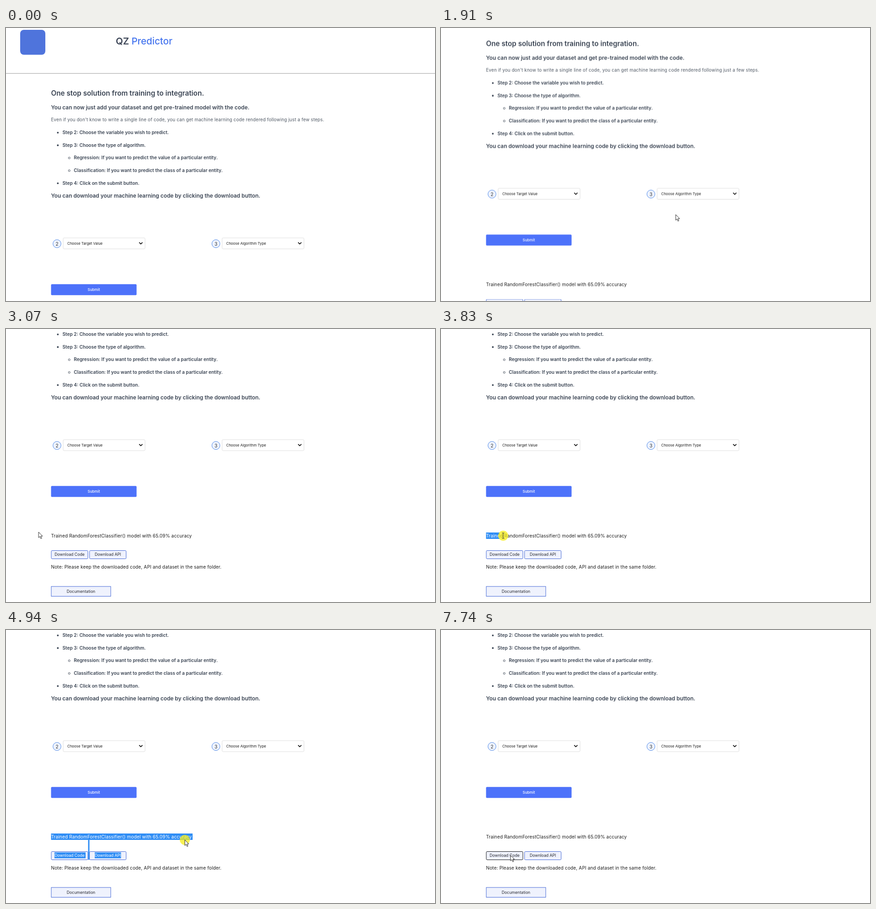
Write an HTML page that moves like this. It is 938 by 597 pixels and loops after 8000 ms.

```html
<!DOCTYPE html>
<html lang="en">
<head>
<meta charset="utf-8">
<title>Model trainer walkthrough</title>
<style>
  html, body { margin: 0; width: 100%; height: 100%; overflow: hidden; background: #fff; }
  svg { display: block; width: 938px; height: 597px; font-family: Inter, "Open Sans", sans-serif; }
  text { white-space: pre; }

  .name { font-size: 20.5px; fill: #3f4859; font-weight: 600; }
  .name .accent { fill: #4474ee; font-weight: 500; }
  .strong { font-weight: 600; fill: #3a4453; }
  .h1 { font-size: 15.25px; }
  .h2 { font-size: 11.88px; }
  .item { font-size: 10.1px; }
  .lead { font-size: 9.8px; letter-spacing: .185px; fill: #4f5864; }
  .body { font-size: 10px; letter-spacing: .16px; fill: #1c1c1c; }
  .small { font-size: 7.85px; fill: #1c1c1c; }
  .num { font-size: 10px; fill: #333; text-anchor: middle; }
  .label { font-size: 8.7px; fill: #26282e; text-anchor: middle; }
  .submit { font-size: 8px; font-weight: 500; }
  .white { fill: #fff; }
  .field { fill: #fff; stroke: #dedede; }
  .btn { fill: #eff2fd; stroke: #4468d6; }
  .mark { fill: #2f8df5; }

  /* All clocks share one 8 s loop. */
  .page, .pointer, .arrow, .beam, .halo, .range, .picked, .api, .code {
    animation: 8s infinite step-end;
    animation-delay: -5ms;
  }
  .page { animation-name: scroll; }
  .pointer { animation-name: move; }
  .arrow { animation-name: arrow; }
  .beam { animation-name: beam; }
  .halo { animation-name: press; }
  .range { animation-name: select; }
  .picked { animation-name: pick; }
  .api { animation-name: api; }
  .code { animation-name: code; }

  @keyframes scroll {
    0% { transform: none; }
    23% { transform: translateY(0); animation-timing-function: steps(4, start); }
    26.5%, 100% { transform: translateY(-217px); }
  }
  @keyframes move {
    0% { transform: translate(955px, 620px); }
    2.5% { transform: translate(955px, 620px); animation-timing-function: steps(5, start); }
    6.9375% { transform: translate(640px, 455px); animation-timing-function: steps(5, start); }
    11.375% { transform: translate(516px, 408px); }
    21.25% { transform: translate(516px, 408px); animation-timing-function: steps(7, start); }
    27.375% { transform: translate(511px, 408px); }
    31.5% { transform: translate(511px, 408px); animation-timing-function: steps(5, start); }
    35.875% { transform: translate(70px, 443px); }
    37.5% { transform: translate(70px, 443px); animation-timing-function: steps(5, start); }
    42.8125% { transform: translate(76px, 448px); }
    44.25% { transform: translate(80px, 448px); }
    45.1375% { transform: translate(80px, 448px); animation-timing-function: steps(4, start); }
    48.6875% { transform: translate(136px, 452px); animation-timing-function: steps(7, start); }
    54.875% { transform: translate(307px, 458px); animation-timing-function: steps(6, start); }
    60.125% { transform: translate(385px, 460px); }
    61.75% { transform: translate(391px, 459px); }
    62.625% { transform: translate(401px, 457px); }
    69.5% { transform: translate(401px, 457px); animation-timing-function: steps(3, start); }
    72.125% { transform: translate(406px, 457px); }
    78.625% { transform: translate(406px, 457px); animation-timing-function: steps(7, start); }
    84.75% { transform: translate(186.5px, 489.5px); }
    87.25% { transform: translate(186.5px, 489.5px); animation-timing-function: steps(11, start); }
    97.7%, 100% { transform: translate(152px, 492.5px); }
  }
  @keyframes arrow {
    0% { opacity: 0; }
    2.5% { opacity: 1; }
    45.1375% { opacity: 0; }
    56.625%, 100% { opacity: 1; }
  }
  @keyframes beam {
    0% { opacity: 0; }
    45.1375% { opacity: 1; }
    56.625%, 100% { opacity: 0; }
  }
  @keyframes press {
    0% { opacity: 0; }
    44.25% { opacity: .72; }
    65.125% { opacity: 0; }
    70.375% { opacity: .72; }
    74.5% { opacity: 0; }
    92.375% { opacity: .72; }
    94.875%, 100% { opacity: 0; }
  }
  @keyframes select {
    0% { width: 0; }
    45.1375% { width: 0; animation-timing-function: steps(4, start); }
    48.6875% { width: 29.5px; animation-timing-function: steps(7, start); }
    54.875% { width: 207px; animation-timing-function: steps(2, start); }
    56.6% { width: 235px; }
    56.625% { width: 309.5px; }
    62.625% { width: 307.5px; }
    92.375%, 100% { width: 0; }
  }
  @keyframes pick {
    0% { opacity: 0; }
    56.625% { opacity: 1; }
    62.625%, 100% { opacity: 0; }
  }
  @keyframes api {
    0% { stroke: #4468d6; }
    83% { stroke: #16181d; }
    89.15%, 100% { stroke: #4468d6; }
  }
  @keyframes code {
    0% { stroke: #4468d6; }
    89.15%, 100% { stroke: #16181d; }
  }
</style>
</head>
<body>
<svg viewBox="0 0 938 597">
  <defs>
    <clipPath id="range"><rect class="range" x="98.5" y="662" width="0" height="14"/></clipPath>
    <g id="picker">
      <circle cx="111.5" cy="471.7" r="8.8" fill="#eef3fe" stroke="#4b86e8"/>
      <rect class="field" x="125" y="459" width="179" height="24" rx="2"/>
      <path d="M291.2 468.8l3.6 3.6 3.6-3.6" fill="none" stroke="#111" stroke-width="1.7"/>
    </g>
  </defs>

  <g class="page">
    <rect x="31" y="4" width="55" height="54.5" rx="8" fill="#4f74dc"/>
    <text class="name" x="240" y="36.3">QZ <tspan class="accent">Predictor</tspan></text>
    <path d="M0 99.3H938" stroke="#9b9b9b"/>

    <g class="strong">
      <text class="h1" x="98.5" y="147.7">One stop solution from training to integration.</text>
      <text class="h2" x="98.5" y="178.3">You can now just add your dataset and get pre-trained model with the code.</text>
      <g class="item">
        <text x="123.5" y="232">Step 2: Choose the variable you wish to predict.</text>
        <text x="123.5" y="259.7">Step 3: Choose the type of algorithm.</text>
        <text x="148.3" y="287.4">Regression: If you want to predict the value of a particular entity.</text>
        <text x="148.3" y="315.1">Classification: If you want to predict the class of a particular entity.</text>
        <text x="123.5" y="342.8">Step 4: Click on the submit button.</text>
        <circle cx="113.3" cy="228.8" r="1.9"/>
        <circle cx="113.3" cy="256.5" r="1.9"/>
        <circle cx="113.3" cy="339.6" r="1.9"/>
        <g fill="none" stroke="#36404f" stroke-width=".9">
          <circle cx="138.3" cy="284.2" r="2"/>
          <circle cx="138.3" cy="311.9" r="2"/>
        </g>
      </g>
      <text class="h2" x="98.5" y="371.3">You can download your machine learning code by clicking the download button.</text>
    </g>
    <text class="lead" x="98.5" y="204.3">Even if you don't know to write a single line of code, you can get machine learning code rendered following just a few steps.</text>

    <use href="#picker"/>
    <use href="#picker" x="347.5"/>
    <text class="num" x="111.5" y="475.5">2</text>
    <text class="num" x="459" y="475.5">3</text>
    <text class="small" x="134" y="473.6">Choose Target Value</text>
    <text class="small" x="481.5" y="473.6">Choose Algorithm Type</text>

    <rect x="98.5" y="560.3" width="187" height="24" rx="2" fill="#4d72fa"/>
    <text class="label white submit" x="192" y="575.3">Submit</text>

    <text class="body" x="98.5" y="672.8">Trained RandomForestClassifier() model with 65.09% accuracy</text>
    <g clip-path="url(#range)">
      <rect class="mark" x="98" y="662" width="312" height="14"/>
      <text class="body white" x="98.5" y="672.8">Trained RandomForestClassifier() model with 65.09% accuracy</text>
    </g>

    <rect class="btn code" x="99" y="701.5" width="80" height="18" rx="2"/>
    <rect class="btn api" x="182.7" y="701.5" width="80" height="18" rx="2"/>
    <text class="label" x="139" y="713.2">Download Code</text>
    <text class="label" x="222.7" y="713.2">Download API</text>
    <g class="picked">
      <path class="mark" d="M179.5 676h3v43.5h-3zM106 703.3h68v13h-68zM194 703.3h57.5v13H194z"/>
      <text class="label white" x="139" y="713.2">Download Code</text>
      <text class="label white" x="222.7" y="713.2">Download API</text>
    </g>

    <text class="body" x="98.5" y="740.8">Note: Please keep the downloaded code, API and dataset in the same folder.</text>
    <rect class="btn" x="99" y="780" width="130" height="21.5"/>
    <text class="label" x="164" y="794">Documentation</text>
  </g>

  <g class="pointer">
    <circle class="halo" r="11" fill="#f7ee12" opacity="0"/>
    <path class="arrow" d="M0 0V12.3L2.9 9.7 4.9 14.4 6.9 13.5 4.9 9H8.7Z" fill="#fff" stroke="#111" stroke-width=".9"/>
    <path class="beam" d="M-2.5-6H-.6L0-5.4.6-6H2.5M0-5.4V5.4M-2.5 6H-.6L0 5.4.6 6H2.5" fill="none" stroke="#222"/>
  </g>
</svg>
</body>
</html>
```
